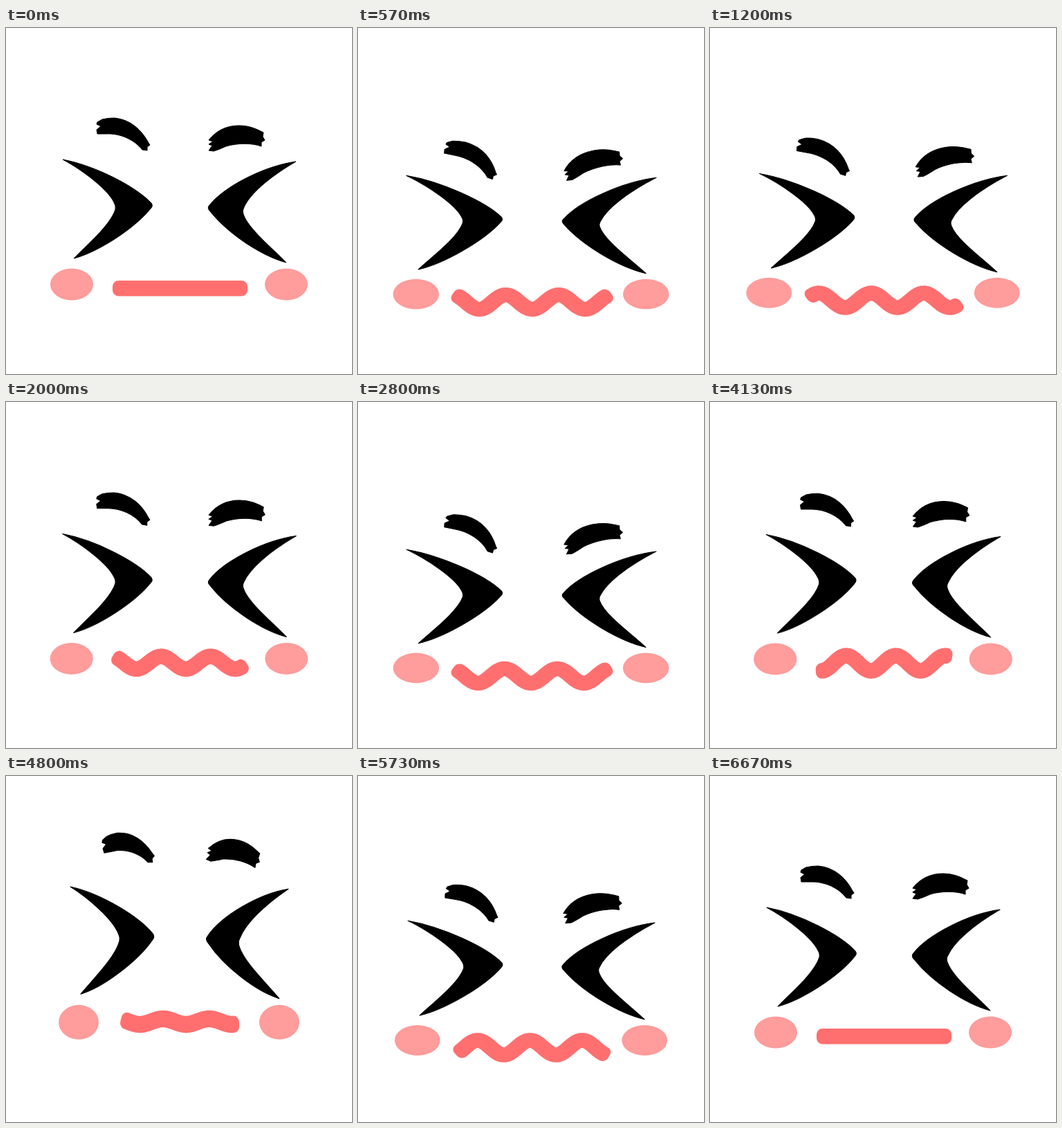
These frames come from a looping animation (500 by 500 pixels, 6.71 s). An HTML page with a canvas:

```html
<!DOCTYPE html>
<html lang="en">
<head>
<meta charset="utf-8">
<title>Wobbly face</title>
<style>
  html, body { margin: 0; width: 100%; height: 100%; overflow: hidden; background: #fff; }
  canvas { display: block; width: 100%; height: 100%; }
</style>
</head>
<body>
<canvas id="stage" width="500" height="500"></canvas>
<script>
const ctx = document.getElementById('stage').getContext('2d');
const LOOP = 6710;
const BEAT = LOOP / 3;      // one hop: stretch, squash, relax
const WAVE = BEAT / 8;      // one ripple of the mouth
const TOP = 315, LOW = 605, RELAX = 700;

const leftEye = new Path2D(`M82 190 C130 199 189 230 210 253 Q213 257 209 261
  C186 290 131 325 98 333 C115 315 151 285 158 262 Q159 257 156 252 C147 233 110 205 82 190Z`);
const rightEye = new Path2D(`M419 193 C374 199 315 229 294 256 Q290 260 295 265
  C320 297 370 330 405 339 C385 318 350 290 343 269 Q341 264 344 259 C352 241 378 217 419 193Z`);
const leftBrow = new Path2D(`M132 136 L139 132 Q147 130 156 130 C181 132 197 149 206 166
  L208 169 L204 172 L204 177 L197 176 C186 162 166 152 145 153 L132 153 L131 147 L137 142 L131 139Z`);
const rightBrow = new Path2D(`M293 162 C305 147 320 141 337 141 C353 141 364 147 372 151
  L371 157 L374 162 L369 165 L369 171 C355 166 335 166 318 171 Q307 176 300 178
  L293 177 L298 170 L293 168 L299 164Z`);

const clamp = u => Math.min(1, Math.max(0, u));
const span = (t, a, b) => clamp((t - a) / (b - a));
const smooth = u => u * u * (3 - 2 * u);
const inOut = (u, tail = 3) =>
  u < 0.5 ? 4 * u ** 3 : 1 - (2 - 2 * u) ** tail / 2;

// -1 is stretched up, 0 is rest, 1 is squashed down
function pose(p) {
  if (p < TOP) return -inOut(span(p, 0, TOP));
  if (p < LOW) return 2 * inOut(span(p, TOP, LOW)) - 1;
  return 1 - inOut(span(p, RELAX, BEAT), 2.5);
}

// Value for the stretched or squashed side, blended from rest
const mix = (s, up, down) => s < 0 ? -s * up : s * down;

function ink(path) {
  ctx.fill(path);
  ctx.stroke(path);
}

function brow(path, x, y, s, up, down) {
  ctx.save();
  ctx.translate(x + mix(s, 2, 0), y + mix(s, -14, 11.6));
  ctx.rotate(mix(s, up, down) * Math.PI / 180);
  ctx.translate(-x, -y);
  ink(path);
  ctx.restore();
}

function cheek(x) {
  ctx.beginPath();
  ctx.ellipse(x, 370.5, 31, 23, 0, 0, Math.PI * 2);
  ctx.fill();
}

function mouth(p, s) {
  const amp = 11 * smooth(span(p, 200, 530)) * (1 - smooth(span(p, 1930, 2200)));
  const half = 97.5 + mix(s, -6, 10.5);
  const mid = 251.5, left = mid - half;
  const k = Math.PI * 2 / 71.3;
  const shift = Math.PI * 2 * (p / WAVE - 0.54);
  const cy = 376.2 + 6.5 * s;
  const soft = 8.5, thick = 11.3 - soft;
  const upper = [], lower = [];
  const steps = 90;
  for (let i = 0; i <= steps; i++) {
    const x = left + soft + (2 * half - 2 * soft) * i / steps;
    const a = k * (x - mid) - shift;
    const y = cy - amp * Math.cos(a);
    const slope = amp * k * Math.sin(a);
    const n = thick / Math.hypot(1, slope);
    upper.push([x + slope * n, y - n]);
    lower.unshift([x - slope * n, y + n]);
  }
  ctx.beginPath();
  for (const [x, y] of upper.concat(lower)) ctx.lineTo(x, y);
  ctx.closePath();
  ctx.lineWidth = soft * 2;
  ctx.fill();
  ctx.stroke();
}

function draw(time) {
  const p = time % LOOP % BEAT;
  const s = pose(p);
  ctx.setTransform(1, 0, 0, 1, 0, 0);
  ctx.fillStyle = '#fff';
  ctx.fillRect(0, 0, 500, 500);

  const sx = 1 + mix(s, -0.065, 0.073);
  const sy = 1 + mix(s, 0.085, -0.052);
  ctx.setTransform(sx, 0, 0, sy, 250 * (1 - sx), mix(s, -46.2, 33.5));

  ctx.fillStyle = ctx.strokeStyle = '#000';
  ctx.lineJoin = 'round';
  ctx.lineWidth = 1;
  ink(leftEye);
  ink(rightEye);
  brow(leftBrow, 170, 154, s, -9, 13);
  brow(rightBrow, 333.5, 159.5, s, 13, -13.5);

  ctx.fillStyle = '#ff9c9c';
  cheek(95);
  cheek(405);

  ctx.fillStyle = ctx.strokeStyle = '#ff6f6f';
  mouth(p, s);
}

const start = performance.now();
function tick() {
  draw(performance.now() - start);
  requestAnimationFrame(tick);
}
tick();
</script>
</body>
</html>
```
